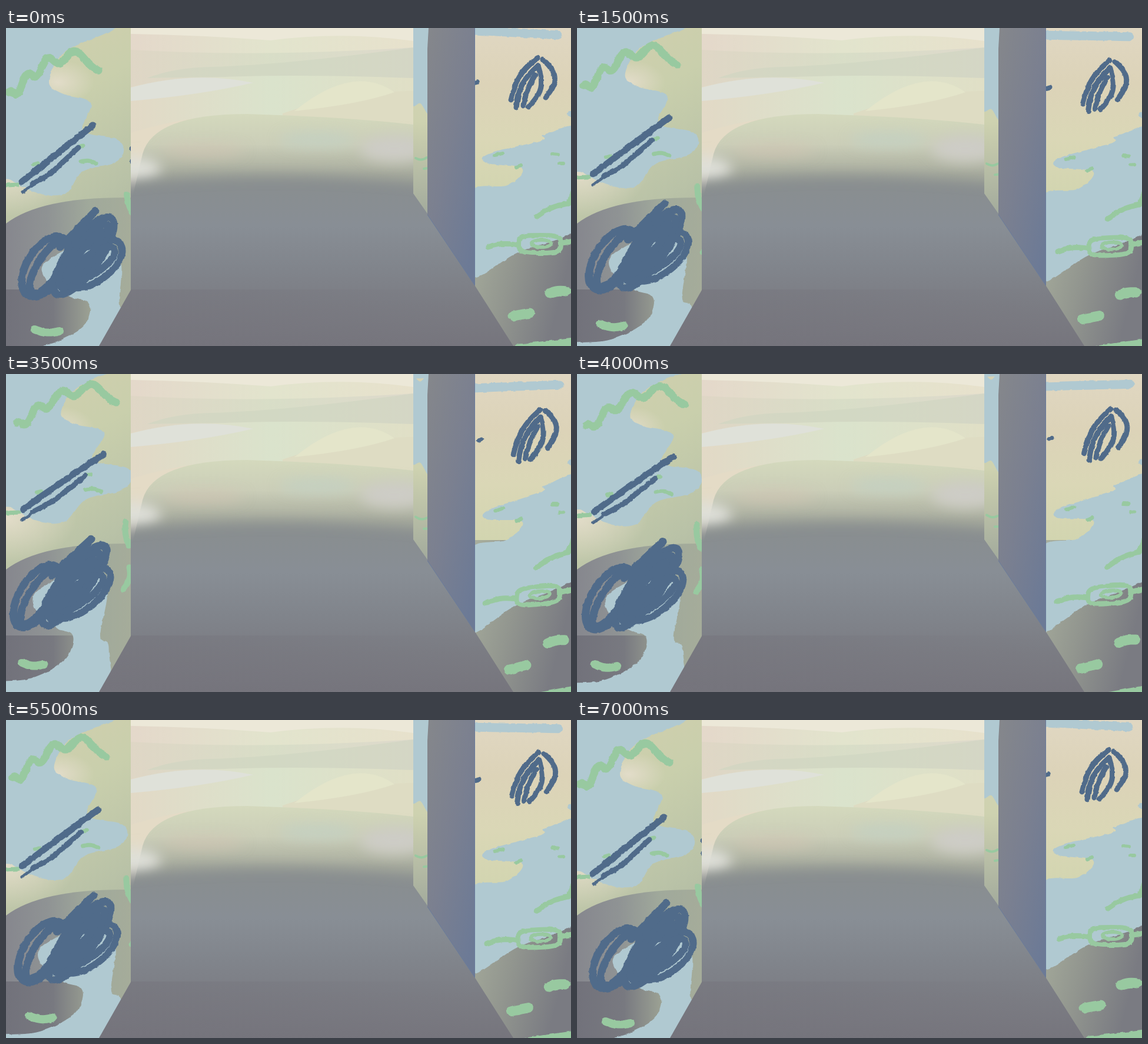
An HTML page for the animation above (7.5 s loop, 960 px wide and 540 px high).

```html
<!DOCTYPE html>
<html lang="en">
<head>
<meta charset="utf-8">
<title>Painted room</title>
<style>
  html, body { margin: 0; width: 100%; height: 100%; overflow: hidden; background: #80838a; }
  svg { display: block; width: 100vw; height: 100vh; }
</style>
</head>
<body>
<svg viewBox="0 0 960 540" preserveAspectRatio="none">
  <defs id="defs">
    <filter id="haze" x="-30%" y="-60%" width="160%" height="220%"><feGaussianBlur stdDeviation="11"/></filter>
    <filter id="rough" filterUnits="userSpaceOnUse" x="-30" y="-30" width="1020" height="600" color-interpolation-filters="sRGB">
      <feTurbulence type="fractalNoise" baseFrequency=".1" numOctaves="2" seed="4"/>
      <feDisplacementMap in="SourceGraphic" scale="4" xChannelSelector="R" yChannelSelector="G"/>
    </filter>
    <mask id="fade" maskUnits="userSpaceOnUse" x="212" y="0" width="480" height="444">
      <path fill="#fff" filter="url(#haze)" d="M120 -80H780V272Q450 230 120 272Z"/>
    </mask>
    <clipPath id="leftClip"><path d="M0 0H212V445L158 540H0Z"/></clipPath>
    <clipPath id="sliverClip"><path d="M692 0H718V318L692 281Z"/></clipPath>
    <clipPath id="rightClip"><path d="M797 0H960V540H862L797 438Z"/></clipPath>
  </defs>

  <path fill="url(#gray)" d="M0 270H960V540H0Z"/>
  <path fill="#898e90" d="M212 0H797V271H212Z"/>
  <path fill="url(#floor)" d="M212 444H797V540H158Z"/>

  <g mask="url(#fade)">
    <path fill="#ece8d8" d="M212 0H692V300H212Z"/>
    <path fill="url(#sky)" d="M212 10Q330 12 450 21Q570 5 692 22V300H212Z"/>
    <path fill="url(#band)" opacity=".65" d="M212 37Q430 50 692 33V120H212Z"/>
    <path fill="#cfd6c1" opacity=".6" d="M240 85Q285 67 350 66Q480 62 692 33V86Q480 80 240 85Z"/>
    <path fill="url(#meadow)" d="M212 100Q330 72 692 85V300H212Z"/>
    <path fill="#dfe1d9" d="M212 101Q320 72 420 93Q330 114 212 124Z"/>
    <path fill="#dedcc3" d="M470 145Q575 108 692 107V180H470Z"/>
    <path fill="#e4e5ca" d="M490 141Q590 60 660 109Q600 130 490 141Z"/>
    <path fill="#e4dbc6" d="M212 178Q270 160 330 152V260H212Z"/>
    <path fill="url(#hill)" d="M232 214Q250 146 410 146Q580 151 692 164V300H212Z"/>
    <g filter="url(#haze)">
      <ellipse cx="215" cy="240" rx="48" ry="22" fill="#dedfd8"/>
      <ellipse cx="335" cy="208" rx="70" ry="8" fill="#d3c3b2" opacity=".7"/>
      <ellipse cx="530" cy="190" rx="65" ry="13" fill="#c0d0c5" opacity=".7"/>
      <ellipse cx="660" cy="205" rx="58" ry="22" fill="#cdccc6"/>
    </g>
  </g>

  <g clip-path="url(#leftClip)">
    <path fill="url(#leftAir)" d="M0 0H212V540H0Z"/>
    <ellipse cx="88" cy="92" rx="62" ry="38" fill="url(#glow)"/>
    <ellipse cx="0" cy="245" rx="120" ry="75" fill="url(#glow)"/>
    <path fill="url(#leftHill)" d="M0 332Q60 286 212 288V540H0Z"/>
    <path fill="url(#leftFloor)" d="M0 444H160V540H0Z"/>
    <g id="left" filter="url(#rough)"></g>
  </g>

  <g clip-path="url(#sliverClip)">
    <path fill="url(#sliverAir)" d="M692 0H718V318H692Z"/>
    <g id="sliver"></g>
  </g>

  <path fill="url(#pillar)" d="M718 0H797V438L716 317V35Z"/>
  <path fill="none" stroke="#697b9b" d="M796.5 0V437L716 317"/>

  <g clip-path="url(#rightClip)">
    <path fill="url(#rightAir)" d="M797 0H960V282H797Z"/>
    <path fill="url(#rightHill)" d="M797 282H960V540H797Z"/>
    <g id="right" filter="url(#rough)"></g>
  </g>
</svg>
<script>
const BLUE = '#b0c9d1', NAVY = '#506b8a', GREEN = '#98c9a0';
const STEP = 500, STEPS = 7, LOOP = 7500;

function make(tag, parent, attrs) {
  const el = document.createElementNS('http://www.w3.org/2000/svg', tag);
  for (const name in attrs) el.setAttribute(name, attrs[name]);
  parent.append(el);
  return el;
}

// Evenly spaced colours; (dx, dy) is the direction across the shape.
function gradient(id, colors, dx, dy) {
  const el = make(dx || dy ? 'linearGradient' : 'radialGradient', defs,
    dx || dy ? { id, x1: 0, y1: 0, x2: dx, y2: dy } : { id });
  colors.split(' ').forEach((color, i, all) =>
    make('stop', el, { offset: i / (all.length - 1), 'stop-color': color }));
}
const defs = document.getElementById('defs');
gradient('gray', '#898e90 #888e95 #81858c #7b7c83 #76757d', 0, 1);
gradient('floor', '#74737b88 #74737b00', 1, 0);
gradient('sky', '#e4d8ca #e2e4cd #e7e1cc', 1, 0);
gradient('band', '#dcd5c3 #d3dac4 #d9d5cb', 1, 0);
gradient('meadow', '#e2d9c6 #dae3cc #e0dfc6', 1, 0);
gradient('hill', '#d4d9bd #cbceb8 #a7ab9d #92978f', 0, 1);
gradient('leftAir', '#d2cfae #c9cfac #b9c2a7 #a5ae9c', .25, 1);
gradient('glow', '#e2dcc9 #e2dcc900', 0, 0);
gradient('leftHill', '#86878e #8f9394 #a0a99b #a5ac9a', 1, 0);
gradient('leftFloor', '#72727b #787980 #a5ac99', 1, 0);
gradient('sliverAir', '#d6d2b4 #ced2b0 #a2aa9c', 0, 1);
gradient('pillar', '#85878b #7b8090 #6c7a96', .8, 1);
gradient('rightAir', '#e0d7c2 #dcd3b8 #dad7b6 #d2d5b0', 0, 1);
gradient('rightHill', '#a8ae9d #92968f #7a7b82', 1, .4);

// Each wall slides differently; a is 0 at rest and 1 at the far end.
const warps = {
  left(x, y, a) {
    const d = 275 - y;
    return [x + a * (.1 + .0007 * x) * d / (1 + Math.abs(d) / 500),
            y - a * (31 - 9 * Math.min(1, (d / 230) ** 2))];
  },
  sliver: (x, y, a) => [x, y + a * (21 + (x - 692) * .15)],
  right: (x, y, a) => [x + a * (250 - y) * (.012 + .0002 * (960 - x)),
                       y + a * (4 + .095 * (960 - x))]
};

const sample = (n, f) => Array.from({ length: n + 1 }, (_, i) => f(i / n));
const keys = text => text.split(' ').map(p => p.split(',').map(Number));

// A line that bulges sideways by `bend` in its middle.
function line(x1, y1, x2, y2, bend = 0) {
  const dx = x2 - x1, dy = y2 - y1, k = bend / Math.hypot(dx, dy);
  return sample(6, t => {
    const s = k * Math.sin(Math.PI * t);
    return [x1 + dx * t + dy * s, y1 + dy * t - dx * s];
  });
}

// A tilted ellipse; `power` below 1 makes it boxy.
function ring(cx, cy, rx, ry, tilt = 0, power = 1) {
  const c = Math.cos(tilt), s = Math.sin(tilt);
  const bulge = v => Math.sign(v) * Math.abs(v) ** power;
  return sample(24, t => {
    const u = rx * bulge(Math.cos(t * 2 * Math.PI)), v = ry * bulge(Math.sin(t * 2 * Math.PI));
    return [cx + u * c - v * s, cy + u * s + v * c];
  });
}

// Catmull-Rom curve through the points.
function curve(pts, closed) {
  const n = pts.length;
  const at = i => pts[closed ? (i + n) % n : Math.max(0, Math.min(n - 1, i))];
  const fmt = p => p.map(v => v.toFixed(1)).join(' ');
  const lean = (p, a, b) => p.map((v, k) => v + (b[k] - a[k]) / 6);
  let d = 'M' + fmt(pts[0]);
  for (let i = 0; i < (closed ? n : n - 1); i++) {
    const p = at(i), q = at(i + 1);
    d += 'C' + [lean(p, at(i - 1), q), lean(q, at(i + 2), p), q].map(fmt).join(' ');
  }
  return d;
}

const shapes = [];
function add(wall, points, closed, paint) {
  const el = make('path', document.getElementById(wall), paint);
  shapes.push({ el, points, closed, warp: warps[wall] });
}
const fill = (wall, color, text) => add(wall, keys(text), true, { fill: color });
const brush = (wall, color, width, ...strokes) => strokes.forEach(points =>
  add(wall, points, false, { fill: 'none', stroke: color, 'stroke-width': width,
    'stroke-linecap': 'round', 'stroke-linejoin': 'round' }));

// Left wall
fill('left', BLUE, '-30,-40 230,-40 183,2 100,41 73,90 95,111 144,127 131,174 188,189 200,210 182,230 130,244 102,281 60,282 10,259 -30,225');
fill('left', BLUE, '194,393 193,470 212,490 205,600 -40,600 -40,550 62,540 125,512 142,485 138,465 106,455 66,425 70,395 150,360');
brush('left', GREEN, 13, sample(40, t => {
  const phase = 5.6 * t - 2 * t * t - .54;
  return [5 + 152 * t, 118 - 70 * Math.sin(2.26 * t) + 9 * Math.cos(2 * Math.PI * phase)];
}));
brush('left', GREEN, 7, line(126, 201, 131, 200), line(127, 227, 153, 230, 3),
  line(47, 232, 54, 230), line(2, 267, 20, 266));
brush('left', GREEN, 14, line(49, 512, 91, 515, -4));
brush('left', GREEN, 10, line(205, 282, 220, 322, -3), line(228, 358, 224, 394, 6));
brush('left', NAVY, 11, line(216, 206, 216, 227, 7), line(148, 165, 27, 261));
brush('left', NAVY, 9, line(123, 203, 76, 247), line(76, 247, 45, 265));
brush('left', NAVY, 5, line(50, 263, 28, 279));
for (let i = 0; i < 3; i++) {
  if (i < 2) brush('left', NAVY, 13, ring(67 + 6 * i, 405, 57 - 4 * i, 31 - 12 * i, -1));
  brush('left', NAVY, 13, ring(132, 387, 79 - 14 * i, 26 - 9 * i, -.94));
  if (i < 2) brush('left', NAVY, 12, ring(148, 400, 57 - 13 * i, 30 - 14 * i, -.62));
}
brush('left', NAVY, 13, line(152, 311, 92, 372));

// Sliver behind the pillar
fill('sliver', BLUE, '688,-6 704,-10 722,-14 722,138 704,128 688,122');
brush('sliver', BLUE, 30, line(685, -27, 725, -34));
brush('sliver', GREEN, 4, line(696, 221, 715, 220, -3), line(710, 239, 716, 238));

// Right wall
fill('right', BLUE, '985,175 914,181 910,191 820,213 816,229 877,239 852,267 785,283 785,420 870,381 985,326');
brush('right', BLUE, 15, line(780, 3, 937, 12));
brush('right', BLUE, 10, line(958, 146, 975, 146));
brush('right', NAVY, 7, line(796, 94, 801, 92));
brush('right', NAVY, 9, line(858, 123, 903, 51, 9), line(867, 135, 904, 64, 9),
  line(879, 132, 899, 80, 3), line(888, 134, 904, 64, -13), line(917, 118, 912, 53, -18));
brush('right', GREEN, 6, line(830, 216, 844, 213), line(867, 237, 875, 234),
  line(928, 214, 937, 215), line(940, 230, 947, 230));
brush('right', GREEN, 9, line(902, 320, 956, 298, 4), line(956, 298, 965, 275),
  line(819, 372, 869, 369, 4), line(944, 365, 965, 362));
brush('right', GREEN, 8, ring(907, 367, 36, 15, 0, .6));
brush('right', GREEN, 6, ring(910, 366, 17, 6));
brush('right', GREEN, 17, line(924, 450, 952, 447, 2), line(862, 489, 890, 484),
  line(872, 545, 975, 534));

function render(amount) {
  for (const { el, warp, closed, points } of shapes)
    el.setAttribute('d', curve(points.map(([x, y]) => warp(x, y, amount)), closed));
}

const start = performance.now();
let shown = -1;
function tick() {
  const step = Math.floor((performance.now() - start) % LOOP / STEP);
  const pose = STEPS - Math.abs(STEPS - step);
  if (pose !== shown) render((shown = pose) / STEPS);
  requestAnimationFrame(tick);
}
tick();
</script>
</body>
</html>
```
